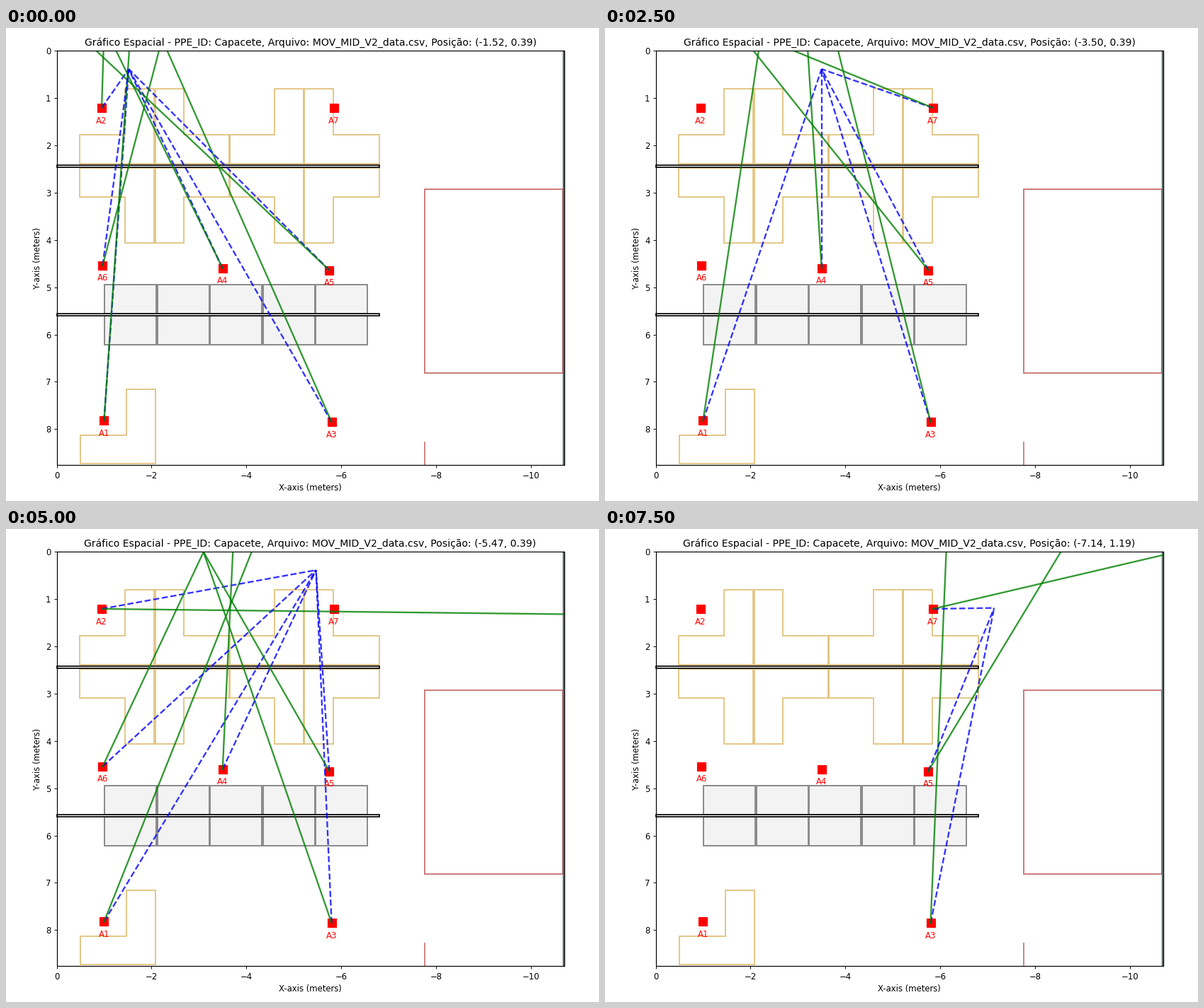
These frames come from a looping animation (837x669 px, 8000 ms). A matplotlib script:

```python
import numpy as np
import matplotlib.pyplot as plt
from matplotlib.animation import FuncAnimation
from matplotlib.patches import Polygon, Rectangle

W, H, DPI = 837, 669, 83.625
FRAMES, STEP_MS = 16, 500
LEFT, RIGHT, TOP, BOTTOM = 71.5, 787.5, 32, 618.5
X_MAX, Y_MAX = 10.70, 8.764

GOLD, GREY, BROWN = "#e0c27c", "#8c8c8c", "#c87070"

# Anchor positions in metres
ANCHORS = {
    "A1": (-1.00, 7.82), "A2": (-0.95, 1.21), "A3": (-5.80, 7.85),
    "A4": (-3.50, 4.60), "A5": (-5.75, 4.64), "A6": (-0.97, 4.54),
    "A7": (-5.85, 1.21),
}

# Estimated bearing per anchor: step -> degrees right of straight up
BEARINGS = {
    "A1": {0: 3.88, 3: 7.45, 5: 8.53, 8: 18.24, 10: 21.72},
    "A2": {0: 1.77, 6: 66, 7: 78, 8: 84.96, 10: 90.66, 13: 93.60},
    "A3": {0: -23.84, 3: -18.04, 5: -13.96, 8: -16.55, 10: -19.02,
           13: -3.92, 15: 2.40},
    "A4": {0: -26.04, 3: -22.65, 5: -3.62, 8: 1.58, 10: 2.70},
    "A5": {0: -46.66, 1: -46, 2: -57, 3: -66.52, 4: -48.34, 5: -38.49,
           8: -31.57, 10: -29.79, 13: -31.57, 15: 31.10},
    "A6": {0: 14.68, 3: 13.08, 7: 5, 8: -11.82, 10: 25.15, 12: 15,
           13: -24.51, 14: -10.73},
    "A7": {5: -67.65, 8: -58.07, 15: 76.80},
}

# Inclusive step ranges in which each anchor hears the tag
HEARD = {
    "A1": [(0, 11)], "A2": [(0, 1), (6, 13)], "A3": [(0, 15)],
    "A4": [(0, 11)], "A5": [(0, 15)], "A6": [(0, 4), (6, 14)],
    "A7": [(5, 9), (14, 15)],
}

# Tag path: step, x, y
PATH = np.array([
    (0, -1.52, 0.39), (3, -2.72, 0.39), (5, -3.50, 0.39), (8, -4.67, 0.39),
    (10, -5.47, 0.39), (12, -6.27, 0.39), (13, -6.68, 0.67), (15, -7.14, 1.19),
])


def px(n):
    """Pixels to points."""
    return n * 72 / DPI


fig = plt.figure(figsize=((W + 1e-6) / DPI, (H + 1e-6) / DPI), dpi=DPI,
                 facecolor="white")

# Floor plan, laid out in pixels
plan = fig.add_axes([0, 0, 1, 1], zorder=0)
plan.set(xlim=(0, W), ylim=(H, 0))
plan.axis("off")


def outline(points, color, width=1.8):
    plan.add_patch(Polygon(points, fill=False, ec=color, lw=px(width),
                           joinstyle="miter"))


def box(x0, y0, x1, y1, color, width=1.8, fill="none"):
    plan.add_patch(Rectangle((x0, y0), x1 - x0, y1 - y0, fc=fill, ec=color,
                             lw=px(width)))


def desk(spine, step, tip, top, mid, base):
    outline([(step, top), (spine, top), (spine, base), (tip, base),
             (tip, mid), (step, mid)], GOLD)


for spine, step, tip in [(209.3, 168.3, 103.6), (210.6, 251, 315),
                         (420.2, 379.2, 316), (421.4, 462, 526.7)]:
    desk(spine, step, tip, 86.3, 151.5, 192)
    desk(spine, step, tip, 304, 239, 198.3)
desk(210.6, 170, 105.2, 510.8, 575.7, 616.2)

for i in range(5):
    x = 139.2 + 74.5 * i
    box(x, 362.7, x + 73.2, 404, GREY, 2, "#f3f3f3")
    box(x, 407.3, x + 73.2, 448.5, GREY, 2, "#f3f3f3")

for y in (193.7, 403.7):
    box(LEFT, y, 526.7, y + 3.2, "black", 1.7, "white")

box(591.3, 227.7, 786, 488.2, BROWN)
plan.plot([590.6] * 2, [586, 618], color=BROWN, lw=px(1.7))
box(785.8, TOP, RIGHT, BOTTOM, "#4c5454", 1.2, "#8a9494")
box(LEFT + 0.5, TOP + 0.3, RIGHT, BOTTOM - 0.6, "black", 1.2)

# Chart on top of the plan
ax = fig.add_axes([LEFT / W, 1 - BOTTOM / H, (RIGHT - LEFT) / W,
                   (BOTTOM - TOP) / H], facecolor="none", zorder=1)
ax.set(xlim=(0, -X_MAX), ylim=(Y_MAX, 0),
       xticks=range(0, -11, -2), yticks=range(9),
       xlabel="X-axis (meters)", ylabel="Y-axis (meters)")
title = ax.set_title("")

blue, green = {}, {}
for name, pos in ANCHORS.items():
    ax.plot(*pos, "s", color="red", ms=10, zorder=1)
    ax.annotate(name, pos, xytext=(0, -10), textcoords="offset points",
                ha="center", va="top", color="red")
    blue[name], = ax.plot([], [], "--", color="blue", lw=2, alpha=0.8)
    green[name], = ax.plot([], [], color="green", lw=2, alpha=0.8)


def draw(step):
    tx, ty = (np.interp(step, PATH[:, 0], PATH[:, k]) for k in (1, 2))
    title.set_text("Gráfico Espacial - PPE_ID: Capacete, "
                   "Arquivo: MOV_MID_V2_data.csv, "
                   f"Posição: ({tx:.2f}, {ty:.2f})")
    for name, (x, y) in ANCHORS.items():
        heard = any(a <= step <= b for a, b in HEARD[name])
        keys = BEARINGS[name]
        angle = np.radians(np.interp(step, list(keys), list(keys.values())))
        blue[name].set_data([x, tx], [y, ty])
        green[name].set_data([x, x - 20 * np.sin(angle)],
                             [y, y - 20 * np.cos(angle)])
        blue[name].set_visible(heard)
        green[name].set_visible(heard)
    return [title, *blue.values(), *green.values()]


anim = FuncAnimation(fig, draw, frames=FRAMES, interval=STEP_MS, repeat=True,
                     repeat_delay=0, blit=False)
plt.show()
```
